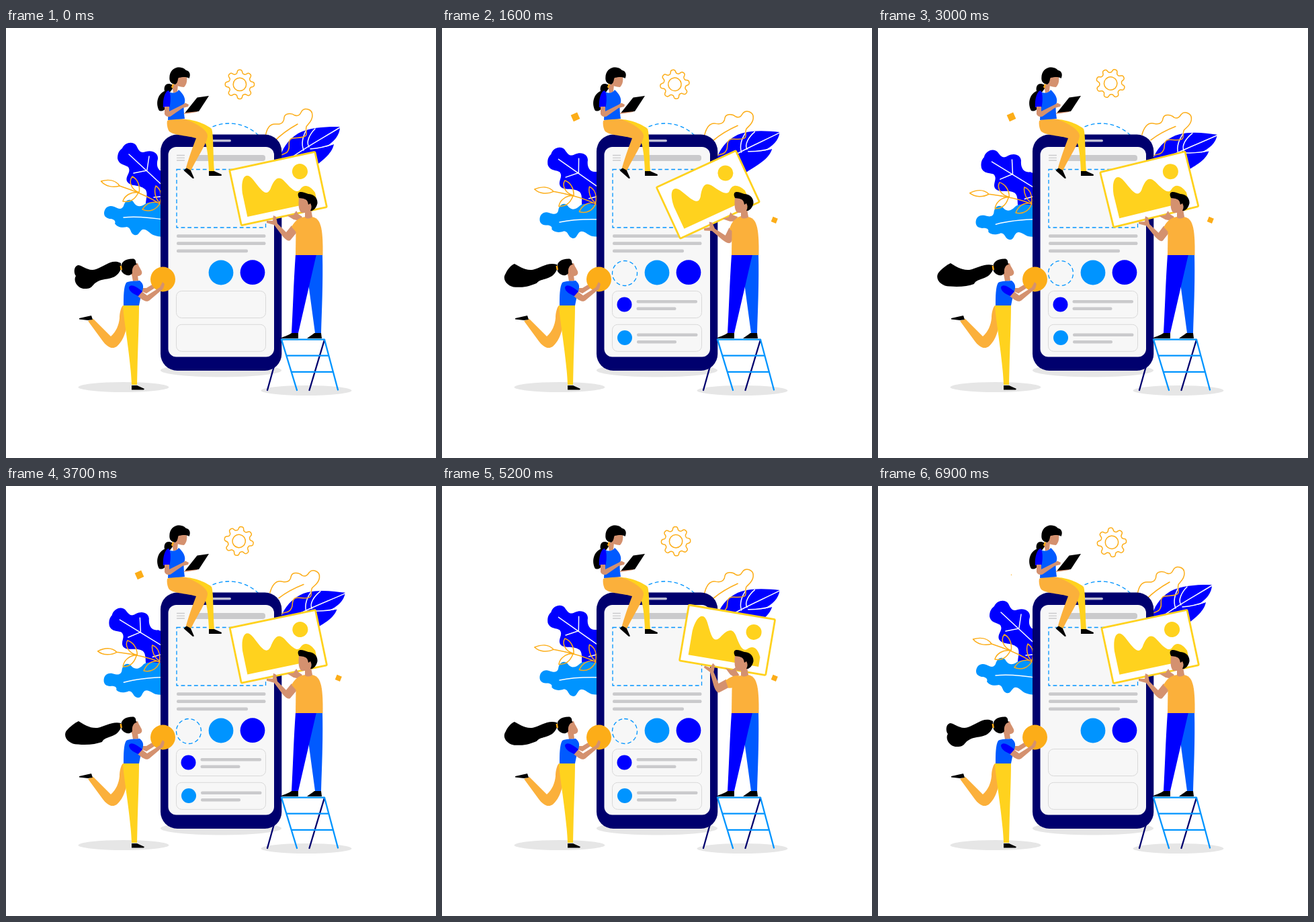
An HTML page that plays this animation: 640 by 640 pixels, repeating every 7000 ms.

```html
<!DOCTYPE html>
<html lang="en">
<head>
<meta charset="utf-8">
<style>
  html, body { margin: 0; height: 100%; overflow: hidden; background: #fff; }
  svg { display: block; width: 100vw; height: 100vh; }
  .navy { fill: #00006e; } .deep { fill: #00f; } .blue { fill: #005aff; } .sky { fill: #0094ff; }
  .sun { fill: #ffd21e; } .amber { fill: #fbb03b; } .gold { fill: #fcad18; }
  .skin { fill: #d4916f; } .grey { fill: #cacacc; } .shade { fill: #e6e6e6; }
  .line { fill: none; stroke-linecap: round; stroke-linejoin: round; }
  .white { stroke: #fff; stroke-width: 1.5; }
  .gilt { stroke: #fcad18; stroke-width: 1.5; }
  .dash { fill: none; stroke: #0094ff; stroke-width: 1.3; stroke-dasharray: 5.8 3.89; }
</style>
</head>
<body>
<svg viewBox="0 0 640 640">
  <ellipse class="shade" cx="175" cy="534.5" rx="67.5" ry="7.5"/>
  <ellipse class="shade" cx="447" cy="539.5" rx="67.5" ry="7.5"/>
  <ellipse class="shade" cx="320" cy="509.5" rx="90" ry="10"/>
  <path id="gear" class="line gilt"/>
  <rect id="chipL" class="gold" x="-5.2" y="-5.2" width="10.4" height="10.4"/>
  <rect id="chipR" class="gold" x="-3.9" y="-3.9" width="7.8" height="7.8"/>
  <circle class="dash" cx="332" cy="205" r="63"/>

  <!-- foliage -->
  <g id="darkLeaf">
    <path class="deep" d="M245 272L208 262C208 255 212 245 207 240C198 232 185 237 180 228C177 220 187 215 182 207C177 203 168 204 166 194C166 186 169 182 173 179C177 170 189 168 194 175C198 183 200 187 208 184C219 181 227 187 226 195C223 205 226 214 236 214L252 225Z"/>
    <path class="line white" d="M183 188L240 241M210 211L213 191M210 212L190 216M240 250L220 252"/>
  </g>
  <g id="skyLeaf">
    <path class="sky" d="M146 275C147 266 154 263 161 266C167 269 172 271 175 265C178 254 187 253 191 261C196 268 203 265 207 262C215 256 226 262 250 268V308C238 312 226 311 219 308C213 305 209 298 203 300C198 303 197 310 191 308C184 305 187 298 180 296C172 298 165 296 162 291C164 287 160 284 154 284C148 282 146 280 146 275Z"/>
    <path class="line white" d="M175 282C195 280 215 282 240 286"/>
  </g>
  <path id="sprig" class="line gilt" d="M169 235C190 242 215 252 229 262M169 235C160 238 148 236 141.500 228C152 225 163 226 169 235M198 245C186 240 182 228 188 221C196 225 200 235 198 245M197 245C186 243 176 250 174 258C184 260 192 255 197 245M229 260C222 255 220 242 223 235C231 240 232 250 229 260M229 261C217 256 208 262 203 270C214 275 224 270 229 261"/>
  <g id="rightLeaves">
    <path class="deep" d="M400 215L408 192C413 174 426 160 441 154C459 147 480 147 497 147C497 160 488 169 476 177L488 173C485 188 470 198 453 211L430 225Z"/>
    <path class="line white" d="M497 148C470 165 440 180 405 207M451 177C446 170 452 158 460 150M443 182C439 172 441 162 448 150M453 180C466 179 478 176 488 172"/>
    <path class="line gilt" d="M386 162C388 148 394 142 402 143C412 144 414 138 414 133C415 127 424 126 430 130C436 132 438 128 440 124C444 118 456 120 456 130C456 139 450 142 447 147C445 154 450 158 445 161C438 165 428 162 424 165C418 170 424 176 420 182C418 188 412 187 408 190M434 143C425 148 412 156 400 168"/>
  </g>

  <path class="line" stroke="#00006e" stroke-width="2.3" d="M410 464L389 539M474 464L451.5 539"/>

  <!-- phone -->
  <rect class="navy" x="230" y="158.5" width="180.3" height="351.5" rx="25"/>
  <rect x="241.5" y="177" width="157.5" height="312.5" rx="12" fill="#f7f7f7"/>
  <rect x="304" y="166" width="31" height="3.6" rx="1.8" fill="#bdbdd6"/>
  <path class="line" stroke="#cacacc" stroke-width="1.3" d="M254.5 189.5H265.5M254.5 193.3H265.5M254.5 197H265.5"/>
  <rect class="grey" x="280" y="189" width="106" height="9" rx="4"/>
  <rect class="dash" x="254" y="210.5" width="132.5" height="86.5"/>
  <g class="grey">
    <rect x="254" y="307.3" width="132.5" height="4.6" rx="2"/>
    <rect x="254" y="318.3" width="132.5" height="4.6" rx="2"/>
    <rect x="254" y="329.6" width="106" height="4.6" rx="2"/>
  </g>
  <circle class="sky" cx="320" cy="364" r="18.4"/>
  <circle class="deep" cx="367" cy="363.7" r="18.4"/>
  <circle id="ring" class="dash" r="18.5"/>
  <g fill="none" stroke="#d9d9d9">
    <rect x="253.5" y="391.5" width="133" height="40" rx="8"/>
    <rect x="253.5" y="441.3" width="133" height="40" rx="8"/>
  </g>
  <g id="row1" class="grey">
    <circle class="deep" r="11"/>
    <rect x="18" y="-6.5" width="90.5" height="4.6" rx="2"/><rect x="18" y="4" width="59" height="4.6" rx="2"/>
  </g>
  <g id="row2" class="grey">
    <circle class="sky" r="11"/>
    <rect x="18" y="-6.5" width="90.5" height="4.6" rx="2"/><rect x="18" y="4" width="59" height="4.6" rx="2"/>
  </g>

  <!-- seated woman -->
  <path d="M248 85C240 80 234 85 236 94C226 98 222 112 228 123C233 125 238 122 238 115C236 105 244 96 248 90Z"/>
  <path class="sun" d="M258 136C278 134 299 144 306 150C309 158 308 185 310 213H302C301 190 299 170 292 160L262 146Z"/>
  <path d="M302 213H310L321 218L320.5 220H302Z"/>
  <path id="foot" d="M269 208L264.5 212L278 224L280 223.5L274.5 211Z"/>
  <path class="amber" d="M240 138C248 134 258 134 267 136C282 141 301 152 300 161C299 172 285 192 275.5 212L268 208C273 190 280 172 283 164C270 160 250 160 243 154C240 150 239 142 240 138Z"/>
  <path class="skin" d="M247 84L256 84L255 95L249 97Z"/>
  <path class="blue" d="M242 94C247 99 255 96 257 92C266 100 268 107 265 114C264 120 265 128 266 135L241 137C242 125 241 110 236 105Z"/>
  <path class="deep" d="M234 118C233 108 236 94 242 93C246 98 245 110 243.5 118Z"/>
  <path class="skin" d="M264 128L271 122L279 124L287 118L289 120L284 125L272 127Z"/>
  <path d="M302 101L284.5 103.5L266.5 126L287 124Z"/>
  <path class="skin" d="M236 117H243V124L263 114L267 111.5L272 114L271 117L263 119L245 131.5C240 133 237 131 236 128Z"/>
  <path class="skin" d="M255 72H269C270 78 269 84 265 88C260 88 255 87 252 83Z"/>
  <path d="M243.5 77C242 65 250 58 258 58.5C264 59 266 61 268 63C274 64 275 70 272.5 75C268 72 263 73 257 74C255 76 257 80 252 84C246 83 244 80 243.5 77Z"/>
  <path class="gold" d="M248 83L250 84L248 90L246 88Z"/>

  <!-- running woman -->
  <path id="hair"/>
  <path class="amber" d="M174 413H184C182 440 178 462 166 473C158 480 150 474 144 466L122 436L130 433L156 459C164 452 168 442 169 432C169 424 171 416 174 413Z"/>
  <path d="M109 432L127 428L129 434L122 435L109 433.5Z"/>
  <path class="sun" d="M174 413H198C198 440 196 480 195 531H187C186 500 178 450 175 425Z"/>
  <path d="M187 532H195L206 537L205 538.5H187Z"/>
  <path class="skin" d="M203 387L209 387L219 381L223 386L209 395L202 392ZM187 366L196 368L197 376L189 377Z"/>
  <path class="blue" d="M179 379C184 376 192 377 199 376C206 382 205 386 201 398L198 413H175C175 400 175 385 179 379Z"/>
  <circle class="gold" cx="233.5" cy="374" r="18.5"/>
  <path class="skin" d="M202 392L210 398L229 386L233 378L236 381L234 388L214 405C210 409 204 406 196 399Z"/>
  <path class="deep" d="M183 386C185 381 192 383 203 392L197 399C190 396 183 392 183 386Z"/>
  <path class="skin" d="M186 352L196 350C198 357 204 362 202 366C200 370 194 370 188 369L184 362Z"/>
  <path d="M171.5 358C170 348 178 343 190 343.5C195 346 192 350 195 352C190 352 187 358 188 365C185 370 176 369 172 362Z"/>
  <path class="gold" d="M169.5 354H172L173 360H170.5Z"/>

  <!-- man on the ladder -->
  <g id="card">
    <rect x="350.5" y="190.7" width="130" height="84" rx="1.5" fill="#fff" stroke="#ffd21e" stroke-width="2.8"/>
    <path class="sun" d="M362 264V228C364 205 374 196 382 212C390 228 395 242 404 231C413 217 420 213 427 224C434 236 441 247 447 241C455 233 463 238 468 250V264Z"/>
    <circle class="sun" cx="452.5" cy="214.5" r="11.5"/>
    <g transform="rotate(12.1 440.5 285)">
      <path class="skin" d="M418 279L428 278L432 272L435 277L441 281L437 287L428 285Z"/>
      <path class="skin" d="M433 304L423 316C420 318 416 315 411 309L399 293L388 290V287L397 287L398 279L402 281L404 291L417 304L425 294Z"/>
      <path class="amber" d="M446 281C436 282 430 287 425 296L433 305L444 300Z"/>
    </g>
  </g>
  <path class="blue" d="M458 337H471C472 380 470 420 469 454H460L450 380Z"/>
  <path class="deep" d="M431 337H462L435 454H425C427 420 428 380 431 337Z"/>
  <path d="M425 454H435V462H409C412 459 420 458 425 454ZM459 454H469L470 462H448C451 459 456 457 459 454Z"/>
  <path class="amber" d="M431 338L431.5 302L434 290C438 283 446 281 455 281C468 283 472 295 471.5 338Z"/>
  <path class="skin" d="M436 252C435 262 435 272 440 275L445 275V282C449 285 455 283 456 281L454 270L456 256Z"/>
  <path d="M435 246C437 242 444 245 450 247C458 247 464 253 463.5 261C462 268 457 273 453 272C455 268 455 264 453 261L450 263C449 256 447 254 436 253C435 250 434 249 435 246Z"/>
  <path class="line" stroke="#0094ff" stroke-width="2.3" d="M433 539L410 463.7H474L494 538.5M417.5 487.7H480M425 511.8H487"/>
</svg>
<script>
  const LOOP = 7, SWAY = 6.8, ROCK = 3.4;
  const byId = id => document.getElementById(id);
  const move = (id, transform) => byId(id).setAttribute('transform', transform);
  const clamp = x => Math.min(1, Math.max(0, x));
  const ease = x => (1 - Math.cos(Math.PI * clamp(x))) / 2;
  const bump = (t, start, span) => Math.sin(Math.PI * clamp((t - start) / span)) ** 2;
  // Scale of a part that pops in, stays, and shrinks away again.
  const pop = (t, start, end, span) => ease((t - start) / span) * (1 - ease((t - end) / span));

  const hairDown = [171, 350, 157, 343, 147, 355, 134, 359, 122, 363, 114, 353, 107, 353, 100, 355, 101, 366, 104, 369, 99, 377, 108, 389, 118, 388,
    130, 388, 127, 382, 137, 377, 148, 371, 163, 377, 171, 359];
  const hairUp = [171, 353, 158, 350, 147, 358, 136, 360, 125, 361, 116, 355, 108, 350, 102, 353, 95, 358, 90, 364, 83, 374, 95, 385, 107, 384.5,
    122, 386, 134, 384, 143, 381, 148, 371, 164, 376, 171, 360];
  const hairPath = p => {
    const [x, y, ...rest] = hairDown.map((v, i) => v + (hairUp[i] - v) * p);
    return `M${x} ${y}C${rest}Z`;
  };

  const gearPoints = Array.from({ length: 240 }, (_, i) => {
    const a = i * Math.PI / 120, r = 19 + 2.8 * Math.tanh(1.7 * Math.cos(8 * a));
    return [r * Math.cos(a), r * Math.sin(a)].map(v => v.toFixed(2));
  });
  byId('gear').setAttribute('d', `M${gearPoints.join('L')}ZM9.7 0A9.7 9.7 0 1 1 -9.7 0A9.7 9.7 0 1 1 9.7 0`);

  function draw(t) {
    const sway = Math.sin(Math.PI * clamp(t / SWAY));
    move('darkLeaf', `rotate(${-11.5 * sway} 232 262)`);
    move('skyLeaf', `rotate(${-10.5 * sway} 232 285)`);
    move('sprig', `rotate(${-11.3 * sway} 230 262)`);
    move('rightLeaves', `rotate(${7.7 * sway} 412 212)`);
    byId('hair').setAttribute('d', hairPath(sway));

    const tilt = -12.1 - 12.8 * bump(t, 0, ROCK) + 21.8 * bump(t, 3.57, ROCK);
    move('card', `rotate(${tilt} 440.5 285)`);
    move('foot', `rotate(${14 * bump(t, .4, 1)} 269 209)`);
    move('gear', `translate(347.2 83) rotate(${360 * t / LOOP}) translate(.7 .9)`);

    const spark = t > 6.85 ? .12 : pop(t, .1, 4, .4);
    move('chipL', `translate(198.5 132.3) rotate(-24) scale(${spark})`);
    move('chipR', `translate(494.8 285.8) rotate(22) scale(${pop(t, .3, 5.75, .4)})`);
    move('ring', `translate(272 365) rotate(${360 * t / LOOP}) scale(${pop(t, .35, 6.4, .35)})`);
    move('row1', `translate(271.5 411.5) scale(${pop(t, .77, 6.5, .25)})`);
    move('row2', `translate(272 461) scale(${pop(t, 1.1, 6.32, .25)})`);
  }

  function tick(now) {
    draw(now / 1000 % LOOP);
    requestAnimationFrame(tick);
  }
  draw(0);
  requestAnimationFrame(tick);
</script>
</body>
</html>
```
